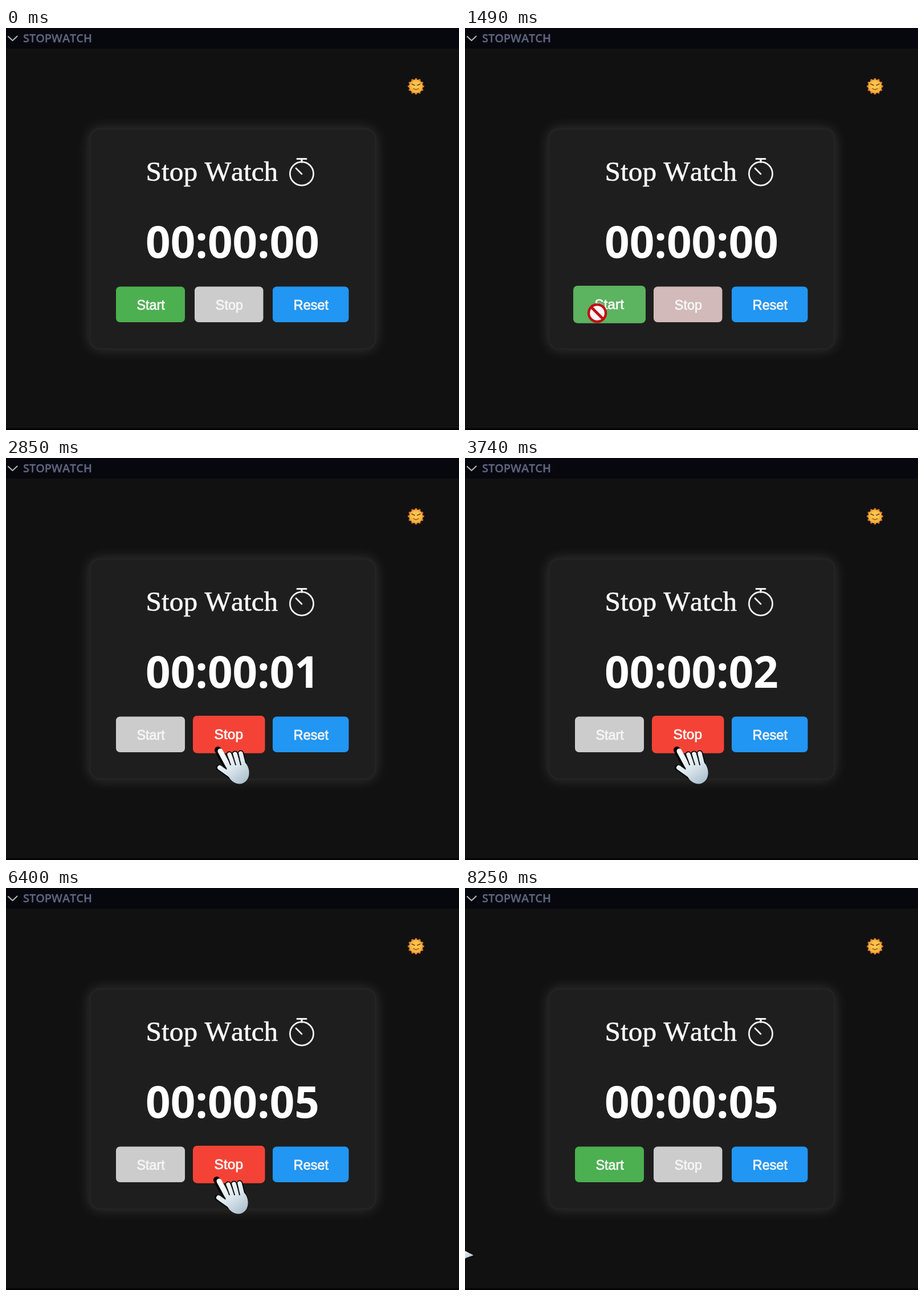
An HTML page with a canvas that plays this animation: 795x705 px, repeating every 8410 ms.

```html
<!DOCTYPE html>
<html lang="en">
<head>
<meta charset="utf-8">
<title>Stopwatch</title>
<style>
html, body { margin: 0; width: 100%; height: 100%; overflow: hidden; background: #111; }
canvas { display: block; filter: blur(.5px); }
</style>
</head>
<body>
<canvas id="stage" width="795" height="705"></canvas>
<script>
const ctx = document.getElementById('stage').getContext('2d');
const LOOP = 8410, FADE = 300;
const START_CLICK = 1455, STOP_CLICK = 6788;
const GREEN = [76, 175, 80], RED = [244, 67, 54], GRAY = [204, 204, 204];
const START = { label: 'Start', x: 193, w: 121 };
const STOP = { label: 'Stop', x: 331, w: 120.5 };
const RESET = { label: 'Reset', x: 468, w: 133.5 };
const ROW_Y = 484.8, ROW_H = 62.6;

// Each glide of the pointer: from time, to time, end point
const ENTRY = { x: 120, y: 720 };
const GLIDES = [
  { from: 400, to: 1080, x: 232, y: 500 },
  { from: 2050, to: 2750, x: 368, y: 508 },
  { from: 4250, to: 4350, x: 366, y: 508 },
  { from: 6800, to: 7000, x: 362, y: 504 },
  { from: 7030, to: 7850, x: -20, y: 625 }
];

const clamp = v => Math.min(1, Math.max(0, v));
const bez = (a, b, s) => 3 * a * s * (1 - s) ** 2 + 3 * b * s * s * (1 - s) + s ** 3;

// CSS "ease"
function ease(x) {
  let lo = 0, hi = 1;
  for (let i = 0; i < 20; i++) {
    const mid = (lo + hi) / 2;
    if (bez(.25, .25, mid) < x) lo = mid; else hi = mid;
  }
  return bez(.1, 1, lo);
}

// 0 to 1 at time "on", back to 0 at time "off"
const toggle = (t, [on, off]) => ease(clamp((t - on) / FADE)) - ease(clamp((t - off) / FADE));

const mix = (a, b, p) => `rgb(${a.map((v, i) => Math.round(v + (b[i] - v) * p))})`;

function pointerAt(t) {
  let { x, y } = ENTRY;
  for (const g of GLIDES) {
    const p = clamp((t - g.from) / (g.to - g.from));
    x += (g.x - x) * p;
    y += (g.y - y) * p;
  }
  return { x, y };
}

const over = (b, p) =>
  Math.abs(p.x - b.x - b.w / 2) < b.w / 2 + 3 && Math.abs(p.y - ROW_Y) < ROW_H / 2 + 2;

// When the pointer enters and leaves a button
function hoverSpan(b) {
  let on = Infinity, off = Infinity;
  for (let t = 0; t < LOOP; t += 5) {
    if (!over(b, pointerAt(t))) continue;
    on = Math.min(on, t);
    off = t + 5;
  }
  return [on, off];
}
const startHover = hoverSpan(START), stopHover = hoverSpan(STOP);

function line(points, width, color) {
  ctx.beginPath();
  points.forEach(p => ctx.lineTo(...p));
  ctx.lineWidth = width;
  ctx.strokeStyle = color;
  ctx.stroke();
}

function disc(x, y, r, color) {
  ctx.beginPath();
  ctx.arc(x, y, r, 0, Math.PI * 2);
  ctx.fillStyle = color;
  ctx.fill();
}

function box(x, y, w, h, r, color) {
  ctx.beginPath();
  ctx.roundRect(x, y, w, h, r);
  ctx.fillStyle = color;
  ctx.fill();
}

function text(str, x, y, font, color, align = 'left', edge = 0) {
  ctx.font = font;
  ctx.textAlign = align;
  ctx.fillStyle = ctx.strokeStyle = color;
  ctx.fillText(str, x, y);
  if (edge) {
    ctx.lineWidth = edge;
    ctx.strokeText(str, x, y);
  }
}

function header() {
  box(0, 0, 795, 36, 0, '#07080e');
  line([[4, 15], [11.5, 22], [19.5, 14.5]], 2.2, '#b4b4b6');
  text('STOPWATCH', 30, 25.4, '600 19.9px "Open Sans", sans-serif', '#5f6580', 'left', .3);
}

function sun() {
  ctx.save();
  ctx.translate(719.5, 102.3);
  ctx.beginPath();
  for (let a = 0; a < Math.PI * 2; a += .06) {
    const r = 13.3 + 1.4 * Math.cos(a * 12);
    ctx.lineTo(r * Math.cos(a), r * Math.sin(a));
  }
  ctx.fillStyle = '#d9772f';
  ctx.fill();
  disc(0, 0, 11.5, '#f4b53b');
  disc(0, -1, 8, '#fac64c');
  for (const side of [-1, 1]) line([[side * 7, -4], [side * 2.5, -2]], 2, '#8a4a20');
  line([[-4.5, 4], [0, 6], [4.5, 4]], 1.6, '#a35a25');
  ctx.restore();
}

function stopwatchIcon() {
  const ink = '#f2f2f2';
  ctx.beginPath();
  ctx.arc(519, 255.5, 20.6, 0, Math.PI * 2);
  ctx.lineWidth = 2.8;
  ctx.strokeStyle = ink;
  ctx.stroke();
  line([[511, 229.5], [527, 229.5]], 3, ink);
  line([[519, 230], [519, 235]], 3.4, ink);
  line([[509, 246], [519, 256]], 2.8, ink);
}

function card() {
  ctx.save();
  ctx.shadowColor = 'rgba(255,255,255,.16)';
  ctx.shadowBlur = 25;
  box(147, 177, 501.5, 386, 18, '#1e1e1e');
  ctx.restore();
  ctx.lineWidth = 3;
  ctx.strokeStyle = '#232323';
  ctx.stroke();
  text('Stop Watch', 245.5, 268, '49.4px "Liberation Serif", serif', '#f8f8f8', 'left', .6);
  stopwatchIcon();
}

function button({ label, x, w }, color, hover = 0) {
  ctx.save();
  ctx.translate(x + w / 2, ROW_Y);
  ctx.scale(1 + .05 * hover, 1 + .05 * hover);
  box(-w / 2, -ROW_H / 2, w, ROW_H, 7, color);
  text(label, .6 - hover, 9.6 - 1.8 * hover, '23.4px "Liberation Sans", sans-serif', '#f5f5f5', 'center', .8);
  ctx.restore();
}

function noEntry() {
  disc(0, 0, 17.2, '#c20d14');
  disc(0, 0, 12.8, '#fafafa');
  line([[-9.5, -9.5], [9.5, 9.5]], 4.6, '#c20d14');
}

function silver(x0, y0, x1, y1) {
  const g = ctx.createLinearGradient(x0, y0, x1, y1);
  g.addColorStop(0, '#ffffff');
  g.addColorStop(.5, '#dde8ef');
  g.addColorStop(1, '#a8bdca');
  return g;
}

function hand() {
  const skin = silver(8, 6, 50, 64);
  const index = [[8, 6], [22, 32]], thumb = [[7, 35], [28, 50]];
  const fingers = [0, 1, 2].map(i => [[24 + 10 * i, 12 - i], [31 + 9 * i, 30]]);
  line(index.map(([x, y]) => [x - 4, y - 2]), 12, '#000');
  line(thumb.map(([x, y]) => [x - 2, y]), 10, '#000');
  fingers.forEach(f => line(f, 11, '#000'));
  ctx.beginPath();
  ctx.ellipse(39, 41, 19, 23, -.4, 0, Math.PI * 2);
  ctx.fillStyle = skin;
  ctx.fill();
  line(thumb, 8, skin);
  line(index, 9, skin);
  fingers.forEach(f => line(f, 7.5, skin));
  fingers.forEach(f => line(f.map(([x, y]) => [x - 5, y]), 2, '#111'));
}

function arrow() {
  const shape = (d, color) => {
    ctx.beginPath();
    [[0, 0], [33, 17], [19, 22], [13, 36]].forEach(([x, y]) => ctx.lineTo(x + d, y + d));
    ctx.fillStyle = color;
    ctx.fill();
  };
  shape(-2, '#000');
  shape(2, silver(2, 2, 28, 34));
}

function pointer(t, running) {
  const p = pointerAt(t), onStart = over(START, p);
  ctx.save();
  ctx.translate(p.x, p.y);
  if (!onStart && !over(STOP, p)) arrow();
  else if (onStart === running) noEntry();
  else hand();
  ctx.restore();
}

function draw(t) {
  const running = t >= START_CLICK && t < STOP_CLICK;
  const active = toggle(t, [START_CLICK, STOP_CLICK]);
  const seconds = Math.floor(Math.max(0, Math.min(t, STOP_CLICK) - 1400) / 1000);
  box(0, 0, 795, 705, 0, '#111');
  header();
  box(0, 702, 795, 3, 0, '#030305');
  sun();
  card();
  text('00:00:0' + seconds, 397.5, 403, '700 76.3px "Open Sans", sans-serif', '#fff', 'center');
  button(START, mix(GREEN, GRAY, active), toggle(t, startHover));
  button(STOP, mix(GRAY, RED, active), toggle(t, stopHover));
  button(RESET, '#2196f3');
  pointer(t, running);
}

ctx.lineCap = ctx.lineJoin = 'round';
ctx.fontKerning = 'none';
const begin = performance.now();
function tick() {
  draw((performance.now() - begin) % LOOP);
  requestAnimationFrame(tick);
}
tick();
</script>
</body>
</html>
```
